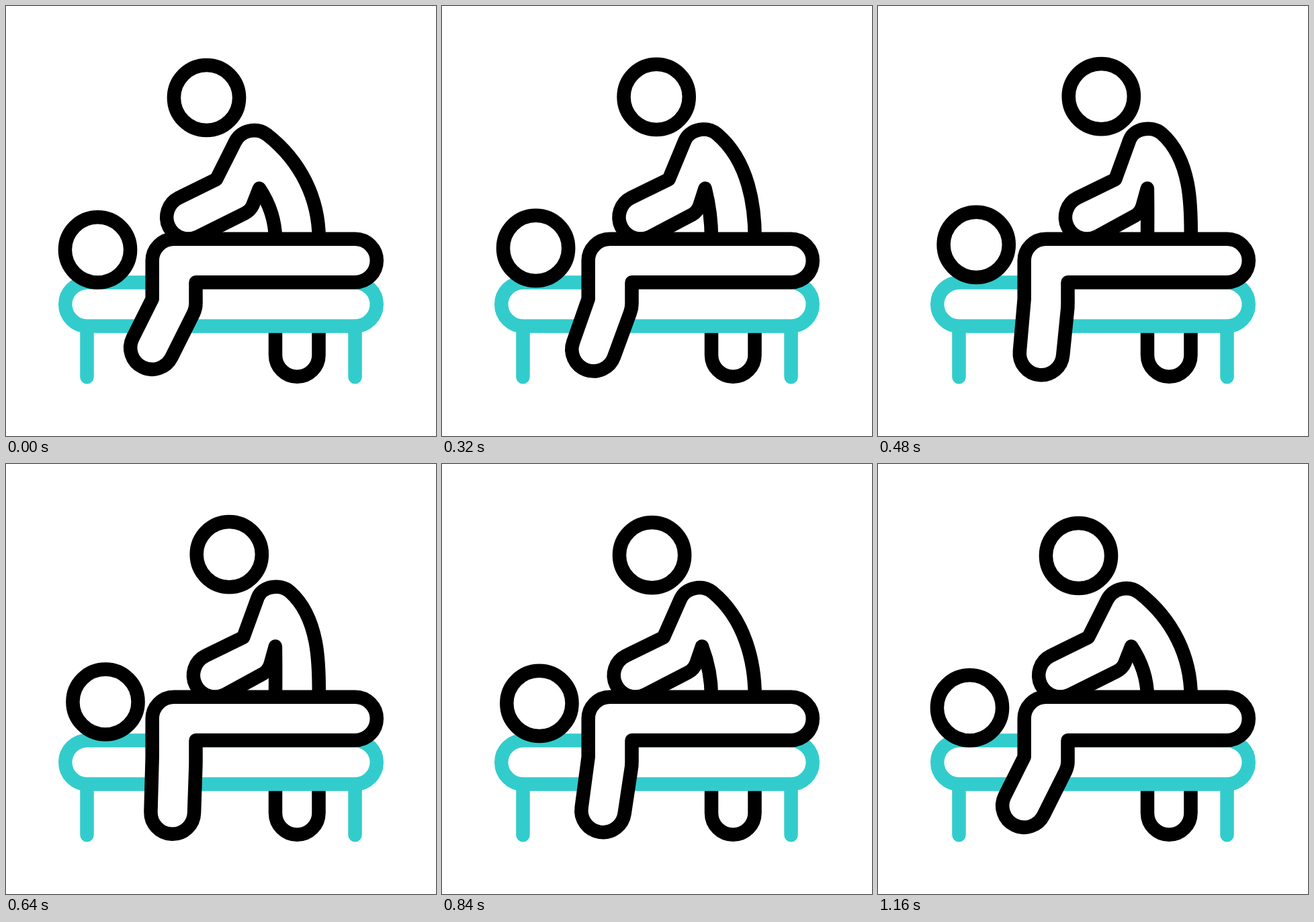
Write an HTML page with a canvas that moves like this. It is 640 by 640 pixels and loops after 1.2 s.

```html
<!DOCTYPE html>
<html lang="en">
<head>
<meta charset="utf-8">
<title>Massage</title>
<style>
  html, body { margin: 0; width: 100%; height: 100%; overflow: hidden; background: #fff; }
  canvas { display: block; width: 640px; height: 640px; }
</style>
</head>
<body>
<canvas id="stage" width="640" height="640"></canvas>
<script>
const ctx = document.getElementById('stage').getContext('2d');
const LOOP = 1200, STEP = 40, SWING = 520;
const LINE = 20.5, R = 32.3;
const BLACK = '#000', TEAL = '#33cccc', WHITE = '#fff';

const mix = (a, b, p) => a + (b - a) * p;

// Symmetric cubic-bezier(k, 0, 1 - k, 1)
function ease(x, k) {
  if (x <= 0) return 0;
  if (x >= 1) return 1;
  let lo = 0, hi = 1;
  for (let i = 0; i < 24; i++) {
    const t = (lo + hi) / 2, u = 1 - t;
    if (3 * k * t * u * u + 3 * (1 - k) * t * t * u + t * t * t < x) lo = t;
    else hi = t;
  }
  return lo * lo * (3 - 2 * lo);
}

// There and back again, beginning at the given time
const swing = (t, start, k) =>
  ease((t - start) / SWING, k) - ease((t - start - SWING) / SWING, k);

function paint(color, fill) {
  if (fill) {
    ctx.fillStyle = WHITE;
    ctx.fill();
  }
  ctx.strokeStyle = color;
  ctx.stroke();
}

function head(x, y) {
  ctx.beginPath();
  ctx.arc(x, y, 48.6, 0, Math.PI * 2);
  paint(BLACK, true);
}

function farFoot() {
  ctx.beginPath();
  ctx.moveTo(401, 470);
  ctx.lineTo(401, 519.5);
  ctx.arc(433.25, 519.5, 32.25, Math.PI, 0, true);
  ctx.lineTo(465.5, 470);
  paint(BLACK);
}

function table() {
  ctx.beginPath();
  for (const x of [120.5, 519.5]) {
    ctx.moveTo(x, 476.5);
    ctx.lineTo(x, 552.25);
  }
  paint(TEAL);
  ctx.beginPath();
  ctx.roundRect(88.25, 411.6, 463.5, 65, 32.5);
  paint(TEAL, true);
}

// Lying body with the arm hanging over the table edge
function patient(p) {
  const x = mix(217.5, 247.75, p), y = mix(508.5, 518.5, p);
  const a = mix(26.6, 1.6, p) * Math.PI / 180;
  ctx.beginPath();
  ctx.moveTo(282.5, 411.3);
  ctx.lineTo(519.5, 411.3);
  ctx.arc(519.5, 379, R, Math.PI / 2, -Math.PI / 2, true);
  ctx.lineTo(250, 346.7);
  ctx.arc(250, 379, R, -Math.PI / 2, Math.PI, true);
  ctx.lineTo(217.7, 436);
  ctx.arc(x, y, R, Math.PI + a, a, true);
  ctx.lineTo(mix(279, 282.2, p), mix(457.7, 455, p));
  ctx.quadraticCurveTo(282.5, 450, 282.5, 443);
  ctx.closePath();
  paint(BLACK, true);
  head(mix(136.5, 148, p), mix(362.8, 354, p));
}

function therapist(p) {
  // Each pair of numbers: leaning forward, sitting back
  const m = (a, b) => mix(a, b, p);
  const handX = m(271.5, 312.3), handY = 314.4, tilt = 1.107;
  ctx.beginPath();
  ctx.moveTo(465.75, 346.75);
  ctx.bezierCurveTo(465.75, m(287, 308), m(439, 469.5), 231, m(388.5, 423.5), m(191.5, 190));
  ctx.bezierCurveTo(m(372.6, 408.5), m(179.8, 177), m(349.7, 381.5), m(185, 182),
    m(340.7, 375.5), m(202.8, 199));
  ctx.lineTo(m(313, 354.3), 258);
  ctx.arc(handX, handY, R, Math.PI + tilt, tilt, true);
  ctx.lineTo(m(355, 384.5), m(308.8, 311.5));
  ctx.quadraticCurveTo(m(363.5, 391.5), m(304.5, 307), m(367, 394.5), 297);
  ctx.lineTo(m(377, 401.5), 271.5);
  ctx.bezierCurveTo(m(392, 401.5), m(294, 296), m(400.75, 401.2), 320, 401, 346.75);
  paint(BLACK);
  head(m(298.5, 333.2), m(136.5, 134.5));
}

function draw(t) {
  ctx.fillStyle = WHITE;
  ctx.fillRect(0, 0, 640, 640);
  ctx.lineWidth = LINE;
  ctx.lineCap = ctx.lineJoin = 'round';
  farFoot();
  table();
  patient(swing(t, 120, 0.54));
  therapist(swing(t, 40, 0.6));
}

const begin = performance.now();
function tick() {
  const t = (performance.now() - begin) % LOOP;
  draw(Math.floor(t / STEP) * STEP);
  requestAnimationFrame(tick);
}
tick();
</script>
</body>
</html>
```
